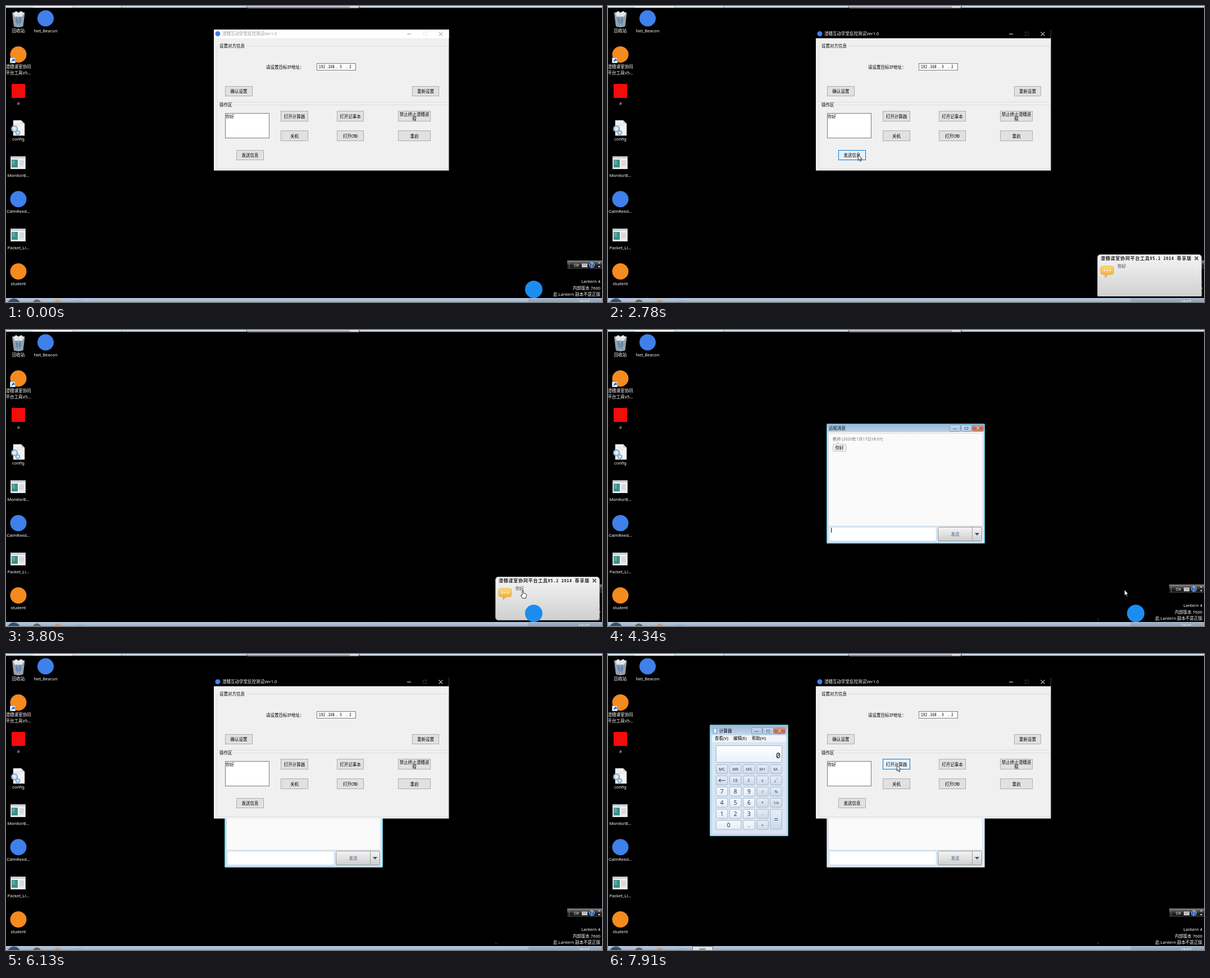
Recreate the animation shown at these times as an HTML page. Size 1061x528 px, loop 7990 ms.

```html
<!DOCTYPE html>
<html lang="zh">
<head>
<meta charset="utf-8">
<title>Remote classroom test</title>
<style>
html, body { margin: 0; width: 100%; height: 100%; overflow: hidden; background: #000; }
svg { display: block; width: 1061px; height: 528px; }
text { font-family: "Noto Sans", "Noto Sans CJK SC", sans-serif; font-size: 7.5px; white-space: pre; }
.song text { font-family: "Noto Sans Mono CJK SC", "Noto Sans CJK SC", "Liberation Mono", monospace; }
.song #titleInk text { font-family: "Noto Sans", "Noto Sans CJK SC", sans-serif; }
</style>
</head>
<body>
<svg id="stage" viewBox="0 0 1061 528" xmlns="http://www.w3.org/2000/svg"></svg>
<script>
const LOOP = 7990;

// Drawing helpers, all returning SVG markup
const rect = (x, y, w, h, fill, more = '') =>
  `<rect x="${x}" y="${y}" width="${w}" height="${h}" fill="${fill}" ${more}/>`;
const box = (x, y, w, h, fill, line, more = '') =>
  rect(x + .5, y + .5, w - 1, h - 1, fill, `stroke="${line}" ${more}`);
const path = (d, fill, more = '') => `<path d="${d}" fill="${fill}" ${more}/>`;
const stroke = (d, color, width = 1) => path(d, 'none', `stroke="${color}" stroke-width="${width}"`);
const disc = (x, y, r, fill, more = '') => `<circle cx="${x}" cy="${y}" r="${r}" fill="${fill}" ${more}/>`;
const text = (x, y, s, fill = '#000', more = '') => `<text x="${x}" y="${y}" fill="${fill}" ${more}>${s}</text>`;
const mid = (x, y, s, fill, size = 7.5) =>
  text(x, y, s, fill, `text-anchor="middle" style="font-size:${size}px"`);
const end = (x, y, s, fill, size = 7.5) =>
  text(x, y, s, fill, `text-anchor="end" style="font-size:${size}px"`);
const group = (id, body, more = '') => `<g id="${id}" ${more}>${body}</g>`;
const fade = (id, ...colors) =>
  `<linearGradient id="${id}" x2="0" y2="1">${colors.map((c, i) =>
    `<stop offset="${i / (colors.length - 1)}" stop-color="${c}"/>`).join('')}</linearGradient>`;

const defs = `<defs>
  ${fade('bar', '#b4c8e2', '#9db5d3')}
  ${fade('lang', '#8a8a8a', '#4a4a4a', '#161616', '#303030')}
  ${fade('note', '#f4f4f4', '#e2e2e2', '#cfcfcf')}
  ${fade('aero', '#9db8d6', '#bcd2ea')}
  ${fade('cap', '#cddcec', '#b3c9e1', '#c3d6ea')}
  ${fade('red', '#d9a48f', '#c0664a', '#cd8462')}
  ${fade('grey', '#f3f3f3', '#e2e2e2', '#cdcdcd')}
  ${fade('key', '#f8fafd', '#e4ecf5')}
  ${fade('op', '#e6eef7', '#cdd9e8')}
  ${fade('lcd', '#ffffff', '#eaf1fa')}
  ${fade('talk', '#ffd97a', '#eda52a')}
  <clipPath id="noteClip"><rect x="860" y="430" width="201" height="88"/></clipPath>
</defs>`;

// Desktop
const bin =
  path('M11.5 12L33 12 30 36Q22 39 14.5 36Z', '#8d99a3', 'stroke="#c3ccd3" stroke-width=".8"') +
  path('M13 13L18 9 22 12 27 9 32 13 29 19 15 19Z', '#e4e9ed') +
  path('M17 20L21 24 26 20 28 28 22 33 17 29Z', '#5f86b4') +
  stroke('M15 15L18 35M29 15L27 35M22 14V36', '#b6c0c8', .7);

const gear = (x, y, r) => disc(x, y, r, 'none', 'stroke="#7fa3c2" stroke-width="2.6" stroke-dasharray="2 .8"') +
  disc(x, y, r, '#c7dcec', 'stroke="#6d92b3" stroke-width=".8"') + disc(x, y, r * .4, '#f4f6f8');
const config = path('M13 204H27L33 210V231H13Z', '#f2f4f6', 'stroke="#bfc5ca" stroke-width=".6"') +
  path('M27 204V210H33Z', '#cdd4da') + stroke('M17 210H25M17 213H29', '#c9ced2', .7) +
  gear(15, 219, 5) + gear(21, 226, 3.2);

const appIcon = y => box(8, y, 27, 23, '#f6f6f6', '#b9bec2') + rect(9, y + 1, 25, 3, '#c4d2dc') +
  rect(10, y + 6, 11, 14, '#3d8f83') + rect(11, y + 7, 5, 8, '#5aa7a0') +
  rect(23, y + 6, 10, 14, '#e2e5e8') + stroke(`M24 ${y + 9}H32M24 ${y + 12}H32M24 ${y + 15}H32`, '#b8bec5', .8);

const shortcut = box(7, 92, 10, 10, '#fff', '#9aa7b4') +
  path('M10 100Q9.500 96.500 12 96L11 94.500H15.500V98.500L14 97.500Q11.500 98 10 100Z', '#2659a8');

const label = (y, s, x = 22) => mid(x, y, s, '#fff');

const desktop =
  rect(0, 0, 1061, 3, '#cdd8e6') + rect(0, 0, 48, 2, '#d9e8f3') + rect(48, 0, 71, 3, '#fcfdfe') +
  rect(120, 0, 85, 2.5, '#d6eaf1') + rect(119, 0, 1, 3, '#8b98a6') + rect(205, 0, 1, 3, '#8b98a6') +
  path('M428 0H630V3L628 4.500H430L428 3Z', '#555a60') + rect(429, 0, 200, 2.5, '#c3ccd6') +
  rect(612, 0, 15, 3, '#dfe4ea') +
  bin + label(47, '回收站') +
  disc(70.5, 22, 14.5, '#3f80ea') + label(47, 'Net_Beacon', 70.5) +
  disc(22, 86.5, 14.5, '#f58a1f') + shortcut + label(111, '澄穗课室协同') + label(122, '平台工具V5...') +
  rect(10, 139, 24, 25, '#f40b0b') + label(176, 'a') +
  config + label(240, 'config') +
  appIcon(268) + label(304.5, 'MonitorB...') +
  disc(22, 344.5, 14.5, '#3f80ea') + label(369, 'CalmReed...') +
  appIcon(397) + label(433.5, 'Packet_Li...') +
  disc(22, 473.5, 14.5, '#f58a1f') + label(498, 'student') +
  end(1058, 494, 'Lantern 4', '#fff') + end(1058, 506, '内部版本 7600', '#fff') +
  end(1058, 517, '此 Lantern 副本不是正版', '#fff') +
  rect(999, 454, 62, 15, 'url(#lang)') + stroke('M1002.500 457V467', '#777') +
  text(1011, 465, 'CH', '#fff', 'style="font:7.5px \'Liberation Mono\',monospace"') +
  rect(1025, 459.5, 10, 6.5, '#d8d8d8') + stroke('M1026 461.500H1034M1026 463.500H1034', '#777', .7) +
  disc(1043, 462, 4.6, '#2f63c4', 'stroke="#cfdcf2" stroke-width=".7"') + mid(1043, 465, '?', '#fff', 8) +
  path('M1054 459H1058L1056 457ZM1054 464H1058L1056 466.500Z', '#fff') +
  rect(0, 521, 1061, 7, 'url(#bar)') + rect(0, 521, 1061, 1, '#c9d8ea') +
  rect(930, 522, 131, 6, '#8296b0', 'opacity=".5"') + mid(1029, 530, '18:07', '#fff') +
  disc(14, 534, 12.5, '#2c4f73', 'stroke="#8fa9c3"') + disc(55, 531, 7.5, '#6c6257') +
  disc(92, 531, 7, '#d99558') + rect(123, 525, 14, 3, '#86bcdc');

const speck = path('M870.500 514L874.500 517.500H872Z', '#4a4030');

// Message popup, drawn with its top at y 440
const popup =
  box(871, 440, 186, 78, 'url(#note)', '#a5a5a5', 'rx="5"') +
  `<g class="song">${text(877, 450, '澄穗课室协同平台工具V5.2 2014 尊享版', '#222',
    'style="font-size:8px;font-weight:700;letter-spacing:.78px"')}</g>` +
  stroke('M1044.500 444L1050.500 450M1050.500 444L1044.500 450', '#555', 1.8) +
  path('M881 461H896Q900 461 900 465V472Q900 476 896 476H890L885 481.500V476H881Q877 476 877 472V465Q877 461 881 461Z',
    'url(#talk)', 'stroke="#d99a2c" stroke-width=".6"') +
  [883.5, 888.5, 893.5].map(x => disc(x, 468.5, 1.2, '#fff')).join('') +
  text(907, 464, '你好', '#444');

// Themed window frame with its title gradient and three caption buttons
const caption = (x, y, w, color, mark) => box(x, y, w, 12, color, '#8299b5', 'rx="2"') +
  stroke(mark, color === 'url(#red)' ? '#fff' : '#5d6f86');
const frame = (id, x, y, w, h, capX, capY) =>
  box(x, y, w, h, '#c4d8ed', '#3fbdd2', `id="${id}" rx="1"`) +
  rect(x + 1, y + 1, w - 2, 15, 'url(#aero)') +
  caption(capX, capY, 20, 'url(#cap)', `M${capX + 6} ${capY + 7.5}h7`) +
  caption(capX + 20, capY, 20, 'url(#cap)', `M${capX + 27.5} ${capY + 4.5}h5v4h-5z`) +
  caption(capX + 40, capY, 21, 'url(#red)', `M${capX + 48} ${capY + 3.5}l5 5m0 -5l-5 5`);

// Chat dialog
const chat =
  frame('chatFrame', 389, 167, 282, 214, 608, 169) + rect(392, 182, 276, 196, '#f0f3f7') +
  text(393, 178, '远程消息') +
  box(392, 184, 275, 166, '#fafafa', '#d8dee5') +
  text(400, 196.5, '教师 (2020年1月17日18:07)', '#707070', 'style="font-size:7.2px"') +
  path('M403 203.500H407L409 200 411 203.500H421Q424 203.500 424 206V214Q424 216.500 421 216.500H403Q400.500 216.500 400.500 214V206Q400.500 203.500 403 203.500Z',
    '#f0f0f0', 'stroke="#b5b5b5" stroke-width=".8"') +
  text(404.5, 212.5, '你好') +
  box(393, 351, 192, 26, '#fff', '#b5cfe7') +
  box(587, 351, 79, 26, 'url(#grey)', '#8d8d8d', 'rx="1"') + stroke('M648.500 352V376', '#a2a2a2') +
  mid(618, 367, '发送', '#4b6186') + path('M653 362H661L657 366.500Z', '#2f528f') +
  rect(397, 353, 1, 8.5, '#000', 'id="caret"');

// Calculator
const keyAt = (col, row, s, w = 21.5, h = 17) => {
  const x = 192 + col * 24.1, y = 197 + row * 19.9;
  const digit = /^[\d.]$/.test(s);
  const size = digit ? 10.5 : /[=←]/.test(s) ? 13 : 7;
  return rect(x + .5, y + .5, w - 1, h - 1, digit ? 'url(#key)' : 'url(#op)', 'stroke="#a3b5c9" rx="2"') +
    mid(x + w / 2, y + h / 2 + size * .37, s, '#1e3958', size);
};
const keys = ['MC MR MS M+ M-', '← CE C ± √', '7 8 9 / %', '4 5 6 * 1/x', '1 2 3 -']
  .map((line, r) => line.split(' ').map((s, c) => keyAt(c, r, s)).join('')).join('') +
  keyAt(4, 4, '=', 21.5, 36.5) + keyAt(0, 5, '0', 45.5) + keyAt(2, 5, '.') + keyAt(3, 5, '+');
const calc =
  frame('calcFrame', 181, 126, 140, 199, 255, 131) +
  box(187, 132, 7, 10, '#dcebf8', '#6f96bd') + text(198, 140, '计算器') +
  rect(185, 145, 132, 176, '#d9e5f2') + rect(185, 145, 132, 12, '#f0f4fa') +
  text(190, 153, '查看(V)') + text(223, 153, '编辑(E)') + text(256, 153, '帮助(H)') +
  box(192, 163, 118, 31, 'url(#lcd)', '#9db0c6', 'rx="2"') +
  text(307, 186, '0', '#111', 'text-anchor="end" style="font:13.5px \'Noto Sans Mono\',monospace"') + keys;
const task = rect(150.5, 521.5, 36, 9, '#dce6f2', 'stroke="#62768f"') + rect(161, 524, 14, 4, '#f0c98a') +
  rect(163, 525, 10, 3, '#7fa7cf');

// Control window
const button = (id, x, y, w, h, s) => box(x, y, w, h, '#e1e1e1', '#adadad', id && `id="${id}"`) +
  mid(x + w / 2, y + h / 2 + 3, s);
const wide = (x, y, s) => button('', x, y, 58, 19, s);
const panel =
  rect(370, 42, 418.5, 251.5, '#f0f0f0') +
  rect(370, 42, 418.5, 15.5, '#fff', 'id="titleBar"') +
  disc(377, 49.5, 4.5, '#3f80ea') +
  group('titleInk', `<text x="385" y="52">澄穗互动学堂反控测试Ver1.0</text>` +
    path('M714 49.500H721V50.500H714Z', 'inherit') +
    path('M770.700 46L773.900 49.200 777.100 46 777.700 46.600 774.500 49.800 777.700 53 777.100 53.600 773.900 50.400 770.700 53.600 770.100 53 773.300 49.800 770.100 46.600Z', 'inherit')) +
  rect(742.5, 46.5, 6, 6, 'none', 'id="maxBox"') +
  stroke('M378 71.500H375.500V171.500H787.500V71.500H427M378 176.500H375.500V290.500H787.500V176.500H404', '#dcdcdc') +
  text(380, 74, '设置对方信息') + text(380, 178.5, '操作区') +
  text(463, 112, '请设置目标IP地址：') +
  box(553, 102, 70, 13, '#fff', '#7a7a7a') +
  [[557, '192'], [570, '.'], [573.5, '168'], [587, '.'], [594, '3'], [604, '.'], [611, '2']]
    .map(([x, s]) => text(x, 110.5, s)).join('') +
  button('', 390, 143, 49, 18, '确认设置') + button('', 723, 143, 48, 18, '重新设置') +
  box(390, 191, 79, 45, '#fff', '#7a7a7a', 'id="field"') + text(391, 199.5, '你好') +
  button('calcBtn', 489, 187, 49, 19, '打开计算器') + button('', 589, 187, 48, 19, '打开记事本') +
  wide(698, 187, '') + mid(727, 196, '禁止终止澄穗进') + mid(727, 203.5, '程') +
  button('', 489, 222, 49, 19, '关机') + button('', 589, 222, 48, 19, '打开CMD') + wide(698, 222, '重启') +
  button('sendBtn', 410, 257, 49, 18, '发送信息');

const pointer =
  group('arrow', path('M.3 .3V10.600L2.600 8.500 4.200 12.300 5.800 11.600 4.200 7.900H7.400Z', '#fff', 'stroke="#000" stroke-width=".8"')) +
  group('beam', stroke('M-2 -5H2M0 -5V5M-2 5H2', '#000')) +
  group('hand', disc(0, 1, 8, '#ffff00', 'id="click" opacity=".6"') +
    path('M-1 1Q0 -.5 1 1V5.500L5.500 6.500Q7 7 6.500 9L5.500 14.500H-.5L-3.500 9.500Q-3.500 7.500 -1 9Z', '#fff', 'stroke="#000" stroke-width=".8"'));

document.getElementById('stage').innerHTML = defs + desktop +
  group('speck', speck) + group('task', task) + group('chat', chat) + group('calc', calc) +
  `<g clip-path="url(#noteClip)">${group('popup', popup)}</g>` +
  group('pet', disc(939.5, 505.5, 15.5, '#1b8df0')) +
  group('panel', panel, 'class="song"') + group('pointer', pointer);

// Pointer moves: start, end, number of steps, from x y, to x y
const moves = [
  [70, 450, 6, 943, 514, 461, 124],
  [600, 1060, 7, 457, 132, 430, 208],
  [1460, 2000, 8, 430, 211, 436, 269],
  [2070, 2230, 3, 437, 269, 439, 268],
  [2300, 2300, 1, 439, 268, 440, 267],
  [2470, 2780, 5, 441, 267, 445, 265],
  [2860, 3250, 6, 500, 290, 936, 466],
  [3320, 3320, 1, 936, 466, 931, 460],
  [3490, 3490, 1, 931, 460, 920, 464],
  [4050, 4050, 1, 920, 464, 919, 463],
  [4510, 4820, 5, 900, 447, 780, 294],
  [4890, 5190, 5, 765, 340, 700, 494],
  [6360, 6590, 4, 676, 482, 568, 181],
  [6760, 6980, 4, 560, 185, 527, 200],
  [7280, 7450, 3, 522, 199, 514, 198],
];
const popupTop = [[2550, 505], [2630, 480], [2700, 458], [2780, 443], [2860, 440]];
const chatFade = [[0, 0], [4130, .35], [4200, .75], [4270, 1]];
const calcFade = [[0, 0], [7680, .35], [7750, .75], [7830, 1]];

const el = id => document.getElementById(id);
const at = (table, t) => table.reduce((v, [start, value]) => t >= start ? value : v, table[0][1]);
const within = (t, a, b) => t >= a && t < b;
const inside = ([x, y], l, top, w, h) => x >= l && x < l + w && y >= top && y < top + h;
const show = (id, on) => { el(id).style.display = on ? '' : 'none'; };
const set = (id, attrs) => { for (const k in attrs) el(id).setAttribute(k, attrs[k]); };

function pointerAt(t) {
  const [a, b, n, x0, y0, x1, y1] = moves.filter(m => t >= m[0]).pop() || moves[0];
  const p = n < 2 ? 1 : Math.min(1, Math.max(0, Math.floor((t - a + 6) / (b - a) * (n - 1)) / (n - 1)));
  return [x0 + (x1 - x0) * p, y0 + (y1 - y0) * p];
}

function draw(t) {
  const pos = pointerAt(t);
  const seen = within(t, 70, 5270) || t >= 6360;
  const panelOn = t < 3720 || t >= 6130;
  const active = within(t, 2470, 3490) || t >= 6130;

  show('panel', panelOn);
  set('titleBar', { fill: active ? '#000' : '#fff' });
  set('titleInk', { fill: active ? '#fff' : '#999' });
  set('maxBox', { stroke: active ? '#333' : '#e8e8e8' });

  const hover = (id, ...area) => {
    const on = seen && panelOn && inside(pos, ...area);
    set(id, { fill: on ? '#e5f1fb' : '#e1e1e1', stroke: on ? '#0078d7' : '#adadad' });
  };
  hover('calcBtn', 489, 187, 49, 19);
  hover('sendBtn', 410, 257, 49, 18);
  const typing = seen && t < 2470 && inside(pos, 390, 191, 79, 45);
  set('field', { stroke: typing ? '#171717' : '#7a7a7a' });

  show('popup', within(t, 2550, 4050));
  set('popup', { transform: `translate(0 ${at(popupTop, t) - 440})` });
  show('pet', t < 2470 || within(t, 3720, 5900));
  show('speck', t >= 4050);

  set('chat', { opacity: at(chatFade, t) });
  set('chatFrame', t < 7600 ? { fill: '#c4d8ed', stroke: '#3fbdd2' } : { fill: '#dbe5f0', stroke: '#8b979f' });
  show('caret', within(t, 4270, 7600) && Math.floor((t - 4290) / 530) % 2 === 0);
  set('calc', { opacity: at(calcFade, t) });
  show('task', t >= 7600);

  const onNote = within(t, 2860, 4050) && inside(pos, 871, 440, 186, 78);
  show('pointer', seen);
  set('pointer', { transform: `translate(${Math.round(pos[0])} ${Math.round(pos[1])})` });
  show('hand', onNote);
  show('beam', typing);
  show('arrow', !onNote && !typing);
  show('click', within(t, 3490, 3720));
}

const begin = performance.now();
function tick() {
  draw((performance.now() - begin) % LOOP);
  requestAnimationFrame(tick);
}
tick();
</script>
</body>
</html>
```
